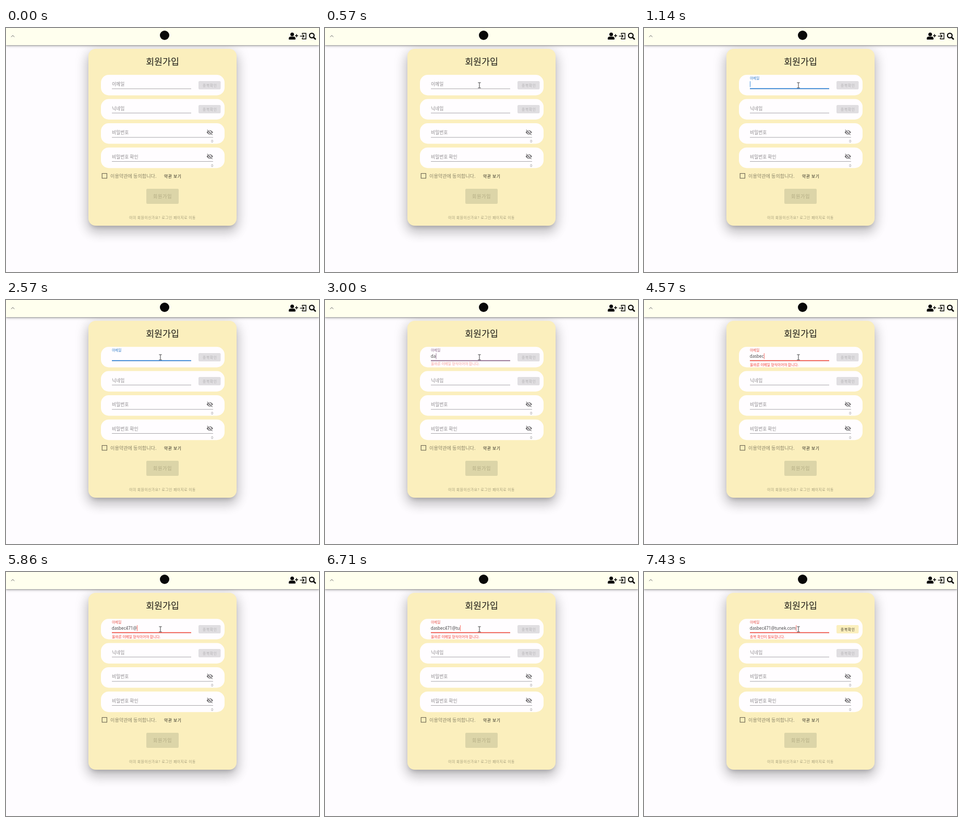
An HTML page with a canvas that plays this animation: 600x469 px, repeating every 8 s.

```html
<!DOCTYPE html>
<html lang="ko">
<head>
<meta charset="utf-8">
<title>회원가입</title>
<style>
html, body { margin: 0; width: 100%; height: 100%; overflow: hidden; background: #fefcff; }
canvas { display: block; width: 600px; height: 469px; }
</style>
</head>
<body>
<canvas id="stage"></canvas>
<script>
const W = 600, H = 469, LOOP = 8000, STEPS_PER_MS = 7 / 1000;
const KOREAN = '"Noto Sans CJK KR", "Noto Sans CJK", sans-serif';
const LATIN = '"Noto Sans", "Open Sans", sans-serif';
const WHITE = '#fffdff', CREAM = '#fbefbd', BLACK = '#080808';
const GREY = [140, 138, 141], BLUE = [25, 118, 210], RED = [244, 67, 54];

const EMAIL = 'dasbec471@tunek.com';
// Step at which each character is typed
const KEYS = [20, 21, 23, 28, 29, 32, 33, 35, 36, 41, 45, 46, 47, 48, 48, 49, 50, 51, 52];
const FOCUS = 5, INVALID = 20, VALID = 50, BLINK = 4;

const canvas = document.getElementById('stage');
const ctx = canvas.getContext('2d');
const dpr = window.devicePixelRatio || 1;
canvas.width = W * dpr;
canvas.height = H * dpr;

const clamp = v => Math.max(0, Math.min(1, v));
const ease = v => v * v * (3 - 2 * v);
const lerp = (a, b, p) => a + (b - a) * p;
const progress = (k, start, length = 2) => ease(clamp((k - start) / length));
const rgb = c => `rgb(${c.map(Math.round).join(',')})`;
const mix = (a, b, p) => a.map((v, i) => lerp(v, b[i], p));

function box(x, y, w, h, r, fill) {
  ctx.beginPath();
  ctx.roundRect(x, y, w, h, r);
  ctx.fillStyle = fill;
  ctx.fill();
}

function shadow(x, y, w, h, r, dy, blur, spread, alpha) {
  const away = 2000;
  ctx.save();
  ctx.shadowColor = `rgba(0,0,0,${alpha})`;
  ctx.shadowBlur = blur * dpr;
  ctx.shadowOffsetX = away * dpr;
  ctx.shadowOffsetY = dy * dpr;
  box(x - away - spread, y - spread, w + 2 * spread, h + 2 * spread, Math.max(0, r + spread), '#000');
  ctx.restore();
}

function line(points, color, width, cap = 'butt') {
  ctx.beginPath();
  for (let i = 0; i < points.length; i += 2) ctx.lineTo(points[i], points[i + 1]);
  ctx.strokeStyle = color;
  ctx.lineWidth = width;
  ctx.lineCap = cap;
  ctx.stroke();
}

function dot(x, y, r, color) {
  ctx.beginPath();
  ctx.arc(x, y, r, 0, Math.PI * 2);
  ctx.fillStyle = color;
  ctx.fill();
}

// y is the optical middle of the line
function text(str, x, y, size, color, { weight = 300, spacing = 0, align = 'left', font = KOREAN } = {}) {
  ctx.font = `${weight} ${size}px ${font}`;
  ctx.letterSpacing = spacing + 'px';
  ctx.textAlign = align;
  ctx.fillStyle = color;
  ctx.fillText(str, x + (align === 'center' ? spacing / 2 : 0), y + size * 0.37);
  ctx.letterSpacing = '0px';
}

function drawHeader() {
  shadow(0, 0, W, 33, 0, 1, 2, 0, 0.3);
  shadow(0, 0, W, 33, 0, 2, 5, 0, 0.22);
  box(0, 0, W, 33, 0, '#ffffee');
  line([10, 17.3, 13, 14.2, 16, 17.3], '#666', 1);
  dot(304, 14, 9, BLACK);

  // Add user
  dot(548.6, 12.3, 3.5, BLACK);
  box(542, 16.6, 13, 5.6, [4, 4, 1, 1], BLACK);
  line([554, 14.8, 560, 14.8], BLACK, 1.5);
  line([557, 11.8, 557, 17.8], BLACK, 1.5);

  // Log in
  line([568, 12.5, 568, 10.3, 575, 10.3, 575, 21, 568, 21, 568, 18.8], BLACK, 1.4);
  line([563.5, 15.6, 571, 15.6], BLACK, 1.4);
  line([568.8, 13, 571.4, 15.6, 568.8, 18.2], BLACK, 1.4);

  // Search
  ctx.beginPath();
  ctx.arc(586.2, 14.5, 4.4, 0, Math.PI * 2);
  ctx.strokeStyle = BLACK;
  ctx.lineWidth = 2.2;
  ctx.stroke();
  line([589.4, 17.7, 593, 21.3], BLACK, 2.7, 'round');
}

function drawEye(x, y) {
  const color = '#757376';
  ctx.beginPath();
  ctx.moveTo(x - 6.2, y);
  ctx.quadraticCurveTo(x, y - 8.4, x + 6.2, y);
  ctx.quadraticCurveTo(x, y + 8.4, x - 6.2, y);
  ctx.fillStyle = color;
  ctx.fill();
  dot(x, y, 2.8, WHITE);
  dot(x, y, 1.7, color);
  line([x - 4.2, y - 5.8, x + 5.8, y + 4.2], WHITE, 1.1);
  line([x - 5, y - 5, x + 4.9, y + 4.9], color, 1.1);
}

function drawCheckButton(y, active) {
  const fill = mix([224, 222, 225], [251, 239, 189], active);
  const ink = mix([180, 178, 181], [65, 61, 45], active);
  box(369, y, 42.5, 16, 2.2, rgb(fill));
  text('중복확인', 390.5, y + 8.2, 6.8, rgb(ink), { spacing: 0.65, align: 'center' });
}

function drawCard() {
  const card = [158, 40, 284, 340, 14];
  shadow(...card, 6, 8, -4, 0.2);
  shadow(...card, 13, 21, 1.7, 0.14);
  shadow(...card, 5, 25, 4.4, 0.12);
  box(...card, CREAM);
  text('회원가입', 300, 65, 17.3, '#1c1b16', { weight: 500, align: 'center' });
  for (const y of [90, 136.5, 183, 229.7]) box(182, y, 237, 39.5, 15, WHITE);

  const grey = rgb(GREY);
  line([203, 116.8, 355, 116.8], '#949296', 0.8);
  line([203, 163.4, 355, 163.4], '#949296', 0.8);
  text('닉네임', 203, 154.5, 8.8, grey);
  drawCheckButton(148, 0);

  [['비밀번호', 201], ['비밀번호 확인', 247.3]].forEach(([label, y]) => {
    text(label, 203, y, 8.8, grey);
    line([203, y + 9.2, 397, y + 9.2], '#949296', 0.8);
    drawEye(390.7, y - 0.4);
    text('0', 397, y + 16.8, 6.6, grey, { align: 'right', font: LATIN });
  });

  ctx.strokeStyle = '#696450';
  ctx.lineWidth = 1.1;
  ctx.strokeRect(184.2, 279.6, 9.2, 9.2);
  text('이용약관에 동의합니다.', 200, 285, 9.15, '#8d876a');
  text('약관 보기', 303, 285.3, 7.7, '#2b291f', { weight: 500, spacing: 0.7 });
  box(269, 309, 62, 29, 2.2, '#dcd5a8');
  text('회원가입', 299.7, 323.5, 9, '#b2ab83', { spacing: 0.8, align: 'center' });
  text('이미 회원이신가요? 로그인 페이지로 이동', 299.7, 364.5, 6.8, '#a39c78', { spacing: 0.55, align: 'center' });
}

function drawMessage(str, alpha) {
  if (alpha <= 0) return;
  ctx.globalAlpha = alpha;
  text(str, 203, lerp(121, 125, alpha), 6.75, rgb(RED));
  ctx.globalAlpha = 1;
}

function drawEmail(k) {
  const focus = progress(k, FOCUS);
  const error = progress(k, INVALID);
  const valid = progress(k, VALID);
  const accent = mix(BLUE, RED, error);

  text('이메일', 203, lerp(108, 96.2, focus), lerp(8.8, 6.6, focus), rgb(mix(GREY, accent, focus * 0.85)));
  if (focus > 0) line([279 - 76 * focus, 116.5, 279 + 76 * focus, 116.5], rgb(accent), 1.4);

  drawMessage('올바른 이메일 형식이어야 합니다.', error * (1 - valid));
  drawMessage('중복 확인이 필요합니다.', valid);
  drawCheckButton(102, valid);

  const typed = KEYS.filter(key => key <= k);
  const value = EMAIL.slice(0, typed.length);
  text(value, 202.7, 108, 8.1, '#4a494b', { weight: 400, font: LATIN });

  const last = typed.length ? typed[typed.length - 1] : FOCUS;
  if (k >= FOCUS && Math.floor((k - last) / BLINK) % 2 === 0) {
    const x = 203.5 + ctx.measureText(value).width;
    line([x, 102.3, x, 113.5], rgb(accent), 0.8);
  }
}

function drawPointer(k) {
  if (k < 1) return;
  const p = progress(k, 1, 3);
  const x = lerp(330, 296, p), y = lerp(378, 110, p);
  if (p < 1) {
    ctx.beginPath();
    for (const [dx, dy] of [[0, 0], [0, 10], [2.4, 7.8], [4, 11.2], [5.4, 10.5], [3.9, 7.2], [7, 7]]) ctx.lineTo(x + dx, y + dy);
    ctx.closePath();
    ctx.fillStyle = '#fff';
    ctx.fill();
    ctx.strokeStyle = '#222';
    ctx.lineWidth = 0.7;
    ctx.stroke();
    return;
  }
  const ink = '#3c3c3e';
  line([x, y - 5, x, y + 5], ink, 1);
  line([x - 2.8, y - 5, x + 2.8, y - 5], ink, 0.9);
  line([x - 2.8, y + 5, x + 2.8, y + 5], ink, 0.9);
}

function draw(now) {
  // The screen advances in seven steps per second
  const k = Math.floor((now % LOOP + 4) * STEPS_PER_MS) % 56;
  ctx.setTransform(dpr, 0, 0, dpr, 0, 0);
  ctx.fillStyle = '#fefcff';
  ctx.fillRect(0, 0, W, H);
  drawCard();
  drawHeader();
  drawEmail(k);
  drawPointer(k);
}

let start;
function tick(now) {
  start ??= now;
  draw(now - start);
  requestAnimationFrame(tick);
}
requestAnimationFrame(tick);
</script>
</body>
</html>
```
